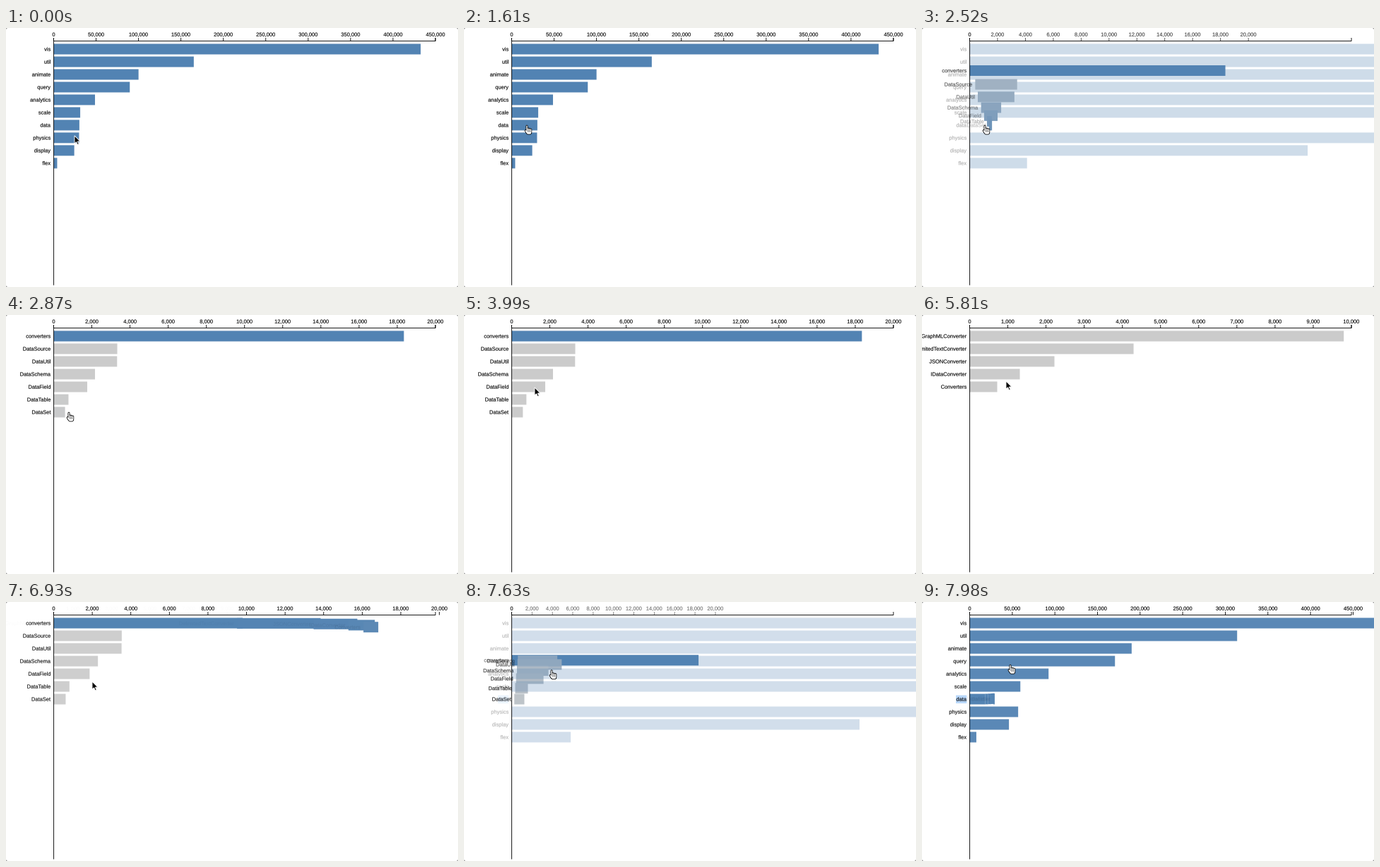
A matplotlib script for the animation above (8 s loop, 640x368 px).

```python
import math
import numpy as np
import matplotlib.pyplot as plt
from matplotlib.animation import FuncAnimation
from matplotlib.patches import PathPatch, Polygon, Rectangle
from matplotlib.textpath import TextPath
from matplotlib.transforms import Affine2D

W, H, DPI = 640, 368, 100
PX = 72 / DPI                      # one pixel in points
LOOP, STEP, TICK = 8000, 20, 70

# Chart layout, in pixels
LEFT, AXIS_Y, SPAN = 67.5, 18.5, 540.5
TOP, BAR, PITCH = 22.5, 15, 18
FONT = 7.5
BLUE = np.array([82, 131, 179]) / 255
GRAY = np.array([203, 203, 203]) / 255

DURATION, DELAY = 750, 25          # of a transition, in ms

CONVERTERS = dict(GraphMLConverter=9800, DelimitedTextConverter=4294,
                  JSONConverter=2220, IDataConverter=1314, Converters=721)
DATA = dict(converters=CONVERTERS, DataSource=3331, DataUtil=3322,
            DataSchema=2165, DataField=1759, DataTable=772, DataSet=586)
ROOT = dict(vis=432629, util=165157, animate=100024, query=89721,
            analytics=48716, scale=31294, data=DATA, physics=29934,
            display=24254, flex=4116)

# Clicks: time and the level it leads to
CLICKS = [(2080, 1), (4974, 2), (6283, 1), (7258, 0)]

# Pointer moves: start, end, x, y, hand or arrow
MOVES = [(0, 350, 420, 18, False), (350, 770, 88, 138, False),
         (910, 980, 89, 138, True), (2980, 3780, 90, 88, False),
         (3850, 3990, 100, 103, False), (4340, 4900, 112, 29, True),
         (5110, 5600, 119, 94, False), (5950, 6300, 122, 113, False),
         (7350, 7840, 125, 89, True)]

fig = plt.figure(figsize=(W / DPI, H / DPI), dpi=DPI, facecolor="white")
ax = fig.add_axes([0, 0, 1, 1])
ax.set_xlim(0, W)
ax.set_ylim(H, 0)
ax.axis("off")

pool = {}        # reusable artists by key
order = [0]      # running paint order


def ease(t):
    t = min(max(t, 0), 1)
    return 4 * t ** 3 if t < .5 else 1 - 4 * (1 - t) ** 3


def mix(a, b, e):
    return a + (b - a) * e


def total(node):
    return sum(map(total, node.values())) if isinstance(node, dict) else node


class Level:
    """Sorted bars of one node, with a rounded axis of about ten ticks."""

    def __init__(self, node, all_parents=False):
        bars = [(name, total(child)) for name, child in node.items()]
        self.bars = sorted(bars, key=lambda b: -b[1])
        self.opened = next((n for n, c in node.items()
                            if isinstance(c, dict)), None)
        self.all_parents = all_parents
        peak = self.bars[0][1]
        unit = 10 ** int(math.log10(peak / 10))
        ratio = 10 * unit / peak
        self.step = unit * (10 if ratio <= .15 else 5 if ratio <= .35
                            else 2 if ratio <= .75 else 1)
        self.top = math.ceil(peak / self.step) * self.step
        self.ticks = set(range(0, self.top + 1, self.step))

    def width(self, value):
        return SPAN * value / self.top

    def color(self, name):
        return BLUE if self.all_parents or name == self.opened else GRAY


LEVELS = [Level(ROOT, True), Level(DATA), Level(CONVERTERS)]


def show(key, make):
    """Fetch or build an artist and paint it above the earlier ones."""
    if key not in pool:
        pool[key] = make()
    art = pool[key]
    order[0] += 1
    art.set_zorder(order[0])
    art.set_visible(True)
    return art


def put_rect(key, x, y, w, h, color, alpha):
    if alpha < .004 or x > W:
        return
    r = show(("rect", key), lambda: ax.add_patch(
        Rectangle((0, 0), 1, 1, lw=0, snap=False)))
    r.set_bounds(x, y, w, h)
    r.set_facecolor(color)
    r.set_alpha(alpha)


def make_text(label, align):
    path = TextPath((0, 0), label, size=FONT,
                    prop={"family": "Liberation Sans"})
    box = path.get_extents()
    path = path.transformed(Affine2D().translate(-mix(box.x0, box.x1, align),
                                                 0).scale(1, -1))
    return ax.add_patch(PathPatch(path, fc="black", ec="black", lw=.12 * PX,
                                  snap=False))


def put_text(key, x, y, label, align, alpha):
    """Draw a label; align is the share of its width left of x."""
    if alpha < .004:
        return
    s = show(("text", key), lambda: make_text(label, align))
    s.set_transform(Affine2D().translate(x, y) + ax.transData)
    s.set_alpha(min(alpha, 1))


def put_line(key, xs, ys, alpha=1, width=.9, color="black", cap="butt"):
    line = show(("line", key), lambda: ax.plot(
        [], [], color=color, lw=width * PX, snap=False, solid_capstyle=cap,
        solid_joinstyle="miter")[0])
    line.set_data(xs, ys)
    line.set_alpha(alpha)


def put_bar(name, x, y, w, color, alpha=1, rect_alpha=1, text_alpha=1):
    put_text(name, LEFT + x - 4.5, TOP + y + 10.1, name, 1,
             alpha * text_alpha)
    put_rect(name, LEFT + x, TOP + y, w, BAR, color, alpha * rect_alpha)


def draw_flat(level, old, new, e, alpha, hide_opened):
    """Bars that stay in their rows while the scale changes."""
    for i, (name, v) in enumerate(level.bars):
        hidden = hide_opened and name == level.opened
        put_bar(name, 0, i * PITCH, mix(old.width(v), new.width(v), e),
                level.color(name), alpha, 0 if hidden else 1)


def draw_stacked(level, parent, old, new, elapsed, opening):
    """Bars that unfold from, or fold into, the row of their parent."""
    names = [name for name, _ in parent.bars]
    home = names.index(parent.opened) * PITCH
    offset = 0
    for i, (name, v) in enumerate(level.bars):
        e = ease((elapsed - i * DELAY) / DURATION)
        out = e if opening else 1 - e
        put_bar(name, mix(offset, 0, out), mix(home, i * PITCH, out),
                mix(old.width(v), new.width(v), e),
                mix(BLUE, level.color(name), out), text_alpha=out)
        offset += parent.width(v)


def draw_axis(old, new, e):
    for v in sorted(old.ticks | new.ticks):
        alpha = mix(v in old.ticks, v in new.ticks, e)
        x = LEFT + mix(old.width(v), new.width(v), e)
        if alpha < .01 or x > W + 20:
            continue
        put_line(v, [x, x], [AXIS_Y - 4.5, AXIS_Y], alpha)
        put_text(v, x, AXIS_Y - 6.75, f"{v:,}", .5, alpha)
    end = LEFT + SPAN
    put_line("domain", [LEFT, LEFT, end, end],
             [AXIS_Y - 4.5, AXIS_Y, AXIS_Y, AXIS_Y - 4.5])


def draw_arrow(x, y):
    shape = np.array([(0, 0), (0, 11.2), (2.6, 8.8), (4.4, 12.9),
                      (6.2, 12.1), (4.4, 8.1), (8, 8.1)])
    p = show("arrow", lambda: ax.add_patch(Polygon(
        shape, fc="black", ec="white", lw=.9 * PX, snap=False)))
    p.set_xy(shape + (x, y))


def draw_hand(x, y):
    """Round strokes for fingers, thumb and palm: black, then white."""
    strokes = [(1.9 * i, 1.2 if i == 0 else 4.6 + .5 * i, 1.9 * i, 10.5)
               for i in range(4)]
    strokes += [(-1.9, 7.8, .2, 10.8), (.6, 11, 5.4, 11), (1, 12, 5, 12)]
    xs, ys = [], []
    for x0, y0, x1, y1 in strokes:
        xs += [x + x0, x + x1, np.nan]
        ys += [y + y0, y + y1, np.nan]
    for color, width in (("black", 3), ("white", 1.4)):
        put_line(color, xs, ys, width=width, color=color, cap="round")


def draw_pointer(t):
    x, y, hand = 97, 153, False
    for start, end, to_x, to_y, to_hand in MOVES:
        e = ease((t - start) / (end - start))
        x, y = mix(x, to_x, e), mix(y, to_y, e)
        hand = to_hand if e > .5 else hand
    (draw_hand if hand else draw_arrow)(x, y)


def draw(i):
    t = (i * STEP + 10) // TICK * TICK
    for art in pool.values():
        art.set_visible(False)
    order[0] = 0

    start, old, new = -LOOP, 0, 0
    for time, level in CLICKS:
        if time <= t:
            start, old, new = time, new, level
    opening = new > old
    a, b = LEVELS[old], LEVELS[new]
    elapsed = t - start
    e = ease(elapsed / DURATION)
    draw_axis(a, b, e)

    if opening:
        draw_flat(a, a, b, e, 1 - e, True)
        draw_stacked(b, a, a, b, elapsed, True)
    else:
        length = DURATION + DELAY * len(a.bars)
        fade = ease(elapsed / length)
        folding = elapsed < length
        if folding:
            draw_stacked(a, b, a, b, elapsed, False)
            if new == 0:
                # selected label
                put_rect("selection", 48, 132.5, 15.3, 11.5,
                         (.71, .84, .98), fade)
        draw_flat(b, a, b, fade, fade, folding)

    put_line("side", [LEFT + .1] * 2, [AXIS_Y, 365.5])
    draw_pointer(t)
    return []


# Faint rounded window corners
for cx, dx in ((0, 2), (W, -2)):
    for cy, dy in ((0, 2), (H, -2)):
        ax.add_patch(Polygon([(cx, cy), (cx + dx, cy), (cx, cy + dy)],
                             fc="#9a9a9a", ec="none", snap=False))

anim = FuncAnimation(fig, draw, frames=LOOP // STEP, interval=STEP,
                     init_func=lambda: draw(0), repeat=True, repeat_delay=0,
                     blit=False)
plt.show()
```
